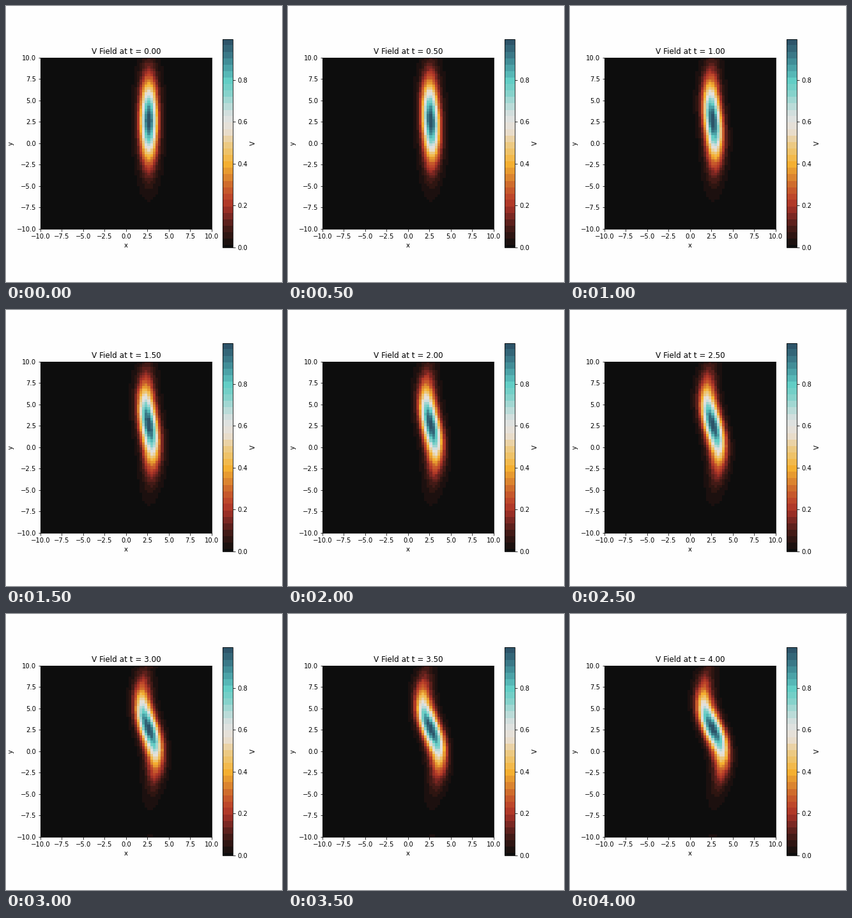
A matplotlib script for the animation above (4500 ms loop, 432 px wide and 432 px high).

```python
import numpy as np
import matplotlib.pyplot as plt
from matplotlib.animation import FuncAnimation
from matplotlib.colors import LinearSegmentedColormap, ListedColormap

N, L, NU = 64, 20.0, 0.001
FRAMES, FRAME_DT, SUBSTEPS = 9, 0.5, 10
VMAX = 0.995
FIRST, BAND = 0.011, 0.0308   # colour bands: first edge and height

# Vorticity / stream function model on a periodic square
h = L / N
x = -L / 2 + h * np.arange(N)
X, Y = np.meshgrid(x, x)
k = 2 * np.pi * np.fft.fftfreq(N, h)
K2 = k[None, :] ** 2 + k[:, None] ** 2
K2[0, 0] = 1.0


def diff(f, axis):
    return (np.roll(f, -1, axis) - np.roll(f, 1, axis)) / (2 * h)


def laplacian(f):
    return sum(np.roll(f, s, a) for s in (-1, 1) for a in (0, 1)) / h**2 - 4 * f / h**2


def rate(w):
    psi = np.fft.ifft2(-np.fft.fft2(w) / K2).real
    advection = diff(psi, 1) * diff(w, 0) - diff(psi, 0) * diff(w, 1)
    return NU * laplacian(w) - advection


def rk4(w, dt):
    a = rate(w)
    b = rate(w + dt / 2 * a)
    c = rate(w + dt / 2 * b)
    d = rate(w + dt * c)
    return w + dt / 6 * (a + 2 * b + 2 * c + d)


def solve():
    w = np.exp(-(X - 2.5) ** 2 - (Y - 2.5) ** 2 / 20)
    fields = [w]
    for _ in range(FRAMES - 1):
        for _ in range(SUBSTEPS):
            w = rk4(w, FRAME_DT / SUBSTEPS)
        fields.append(w)
    return fields


def banded_cmap(size=512):
    stops = ["#0d0d0d", "#2a1411", "#4a1c18", "#7a2722", "#ab3327",
             "#c04a2b", "#cd682c", "#e08f30", "#f5b031", "#efc060",
             "#ebcb8a", "#e8dcc8", "#e4e2e0", "#cfdedd", "#a8d8d4",
             "#7dd0c8", "#62cdc5", "#4fabae", "#3f8893", "#34687a", "#2a4d63"]
    base = LinearSegmentedColormap.from_list("smooth", stops, 1024)
    v = (np.arange(size) + 0.5) / size * VMAX
    level = np.maximum(np.ceil((v - FIRST) / BAND), 0)
    mid = np.where(level > 0, FIRST + (level - 0.5) * BAND, 0)
    return ListedColormap(base(np.clip(mid / VMAX, 0, 1)))


fields = solve()

fig, ax = plt.subplots(figsize=(6, 6), dpi=72, facecolor="#fefefe")
fig.subplots_adjust(left=0.125, right=0.9, bottom=0.125, top=0.88)
im = ax.imshow(fields[0], origin="lower", extent=(-10, 10, -10, 10),
               cmap=banded_cmap(), vmin=0, vmax=VMAX, interpolation="nearest")
ticks = np.arange(-10, 10.1, 2.5)
ax.set(xlabel="x", ylabel="y", xticks=ticks, yticks=ticks)
title = ax.set_title("V Field at t = 0.00")
fig.colorbar(im, ax=ax, label="V", ticks=np.arange(5) * 0.2)


def update(i):
    im.set_data(fields[i])
    title.set_text(f"V Field at t = {i * FRAME_DT:.2f}")
    return im, title


anim = FuncAnimation(fig, update, frames=FRAMES, interval=500,
                     repeat=True, repeat_delay=0, blit=False)
plt.show()
```
